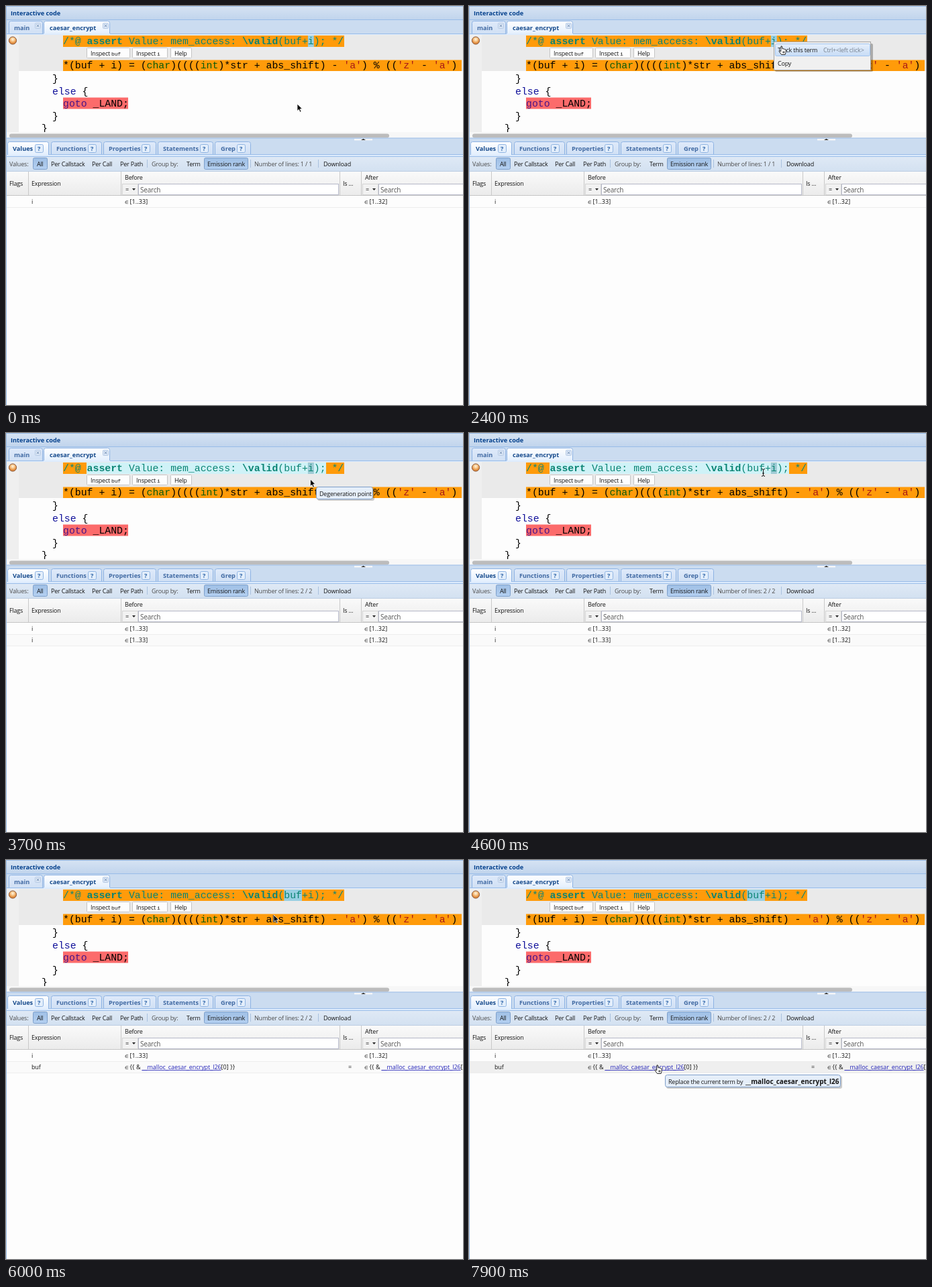
An HTML page that plays this animation: 681 px wide and 595 px high, repeating every 8000 ms.

```html
<!DOCTYPE html>
<html>
<head>
<meta charset="utf-8">
<style>
html, body { margin: 0; width: 100%; height: 100%; overflow: hidden; background: #fff; }
svg { display: block; }
text { font: 9px "Open Sans", "Noto Sans", sans-serif; letter-spacing: -.2px; white-space: pre; }
.b { font-weight: bold; font-size: 9.2px; letter-spacing: 0; }
.bi { font-weight: bold; font-style: italic; font-size: 9.7px; letter-spacing: 0; }
.term { font-weight: bold; font-size: 10px; letter-spacing: 0; }
.code { font: 14.83px "Liberation Mono", monospace; letter-spacing: 0; }
.mono { font-family: "Liberation Mono", monospace; font-size: 8px; }
.search { font-size: 10px; }
.num { letter-spacing: .1px; }
.link { letter-spacing: -.05px; }
.in { font: 6.5px "DejaVu Sans", sans-serif; }
.bold { font-weight: bold; }
</style>
</head>
<body>
<svg id="stage" width="681" height="595" viewBox="0 0 681 595"></svg>
<script>
const rect = (x, y, w, h, fill, more = '') =>
  `<rect x="${x}" y="${y}" width="${w}" height="${h}" fill="${fill}" ${more}/>`;
const box = (x, y, w, h, fill, stroke, r = 0) =>
  rect(x + .5, y + .5, w - 1, h - 1, fill, `stroke="${stroke}" rx="${r}"`);
const text = (x, y, s, cls = '', fill = '#151515') =>
  `<text x="${x}" y="${y}" class="${cls}" fill="${fill}">${s}</text>`;
const group = (id, s) => `<g id="${id}">${s}</g>`;
const span = (s, fill, cls = '') => `<tspan fill="${fill}" class="${cls}">${s}</tspan>`;
const gradient = (id, a, b) => `<linearGradient id="${id}" x2="0" y2="1">
  <stop stop-color="${a}"/><stop offset="1" stop-color="${b}"/></linearGradient>`;

const TEAL = '#0b8474', GREEN = '#0a5a0a', RED = '#a81818', NAVY = '#10109a';
const ORANGE = '#ff9b0a', EDGE = '#99bce8', BAR = '#cbdcf0', PAGE = '#fdfdfd', CHAR = 8.9;

function tab(x, w, y, label, active, labelX) {
  return box(x, y, w, 24, `url(#${active ? 'tabOn' : 'tabOff'})`, '#8db2e3', 3) +
    text(labelX, y + 14, label, 'b', active ? '#15498b' : '#416aa3');
}

function closeMark(x) {
  return box(x, 25, 9, 9, '#dce8f8', '#b4c8e2', 1) +
    `<path d="M${x + 2.7} 27.7l3.6 3.6m0-3.6l-3.6 3.6" stroke="#6482a8"/>`;
}

function helpTab(x, w, label, labelX, markX) {
  return tab(x, w, 202, label, x < 5, labelX) +
    box(markX, 206, 13, 13, '#e3eefb', '#8fb4e2', 2) + text(markX + 4, 216, '?', 'b', '#2d64a8');
}

function button(x, w, label) {
  return box(x, 62, w, 16, '#fdfdfd', '#c4c4c4', 1) + text(x + 6, 73.5, label);
}

function filter(x, inputX, w) {
  return box(x, 265, inputX - x, 17, '#f2f2f2', '#d4d4d4') + text(x + 5, 277, '=') +
    `<path d="M${x + 15} 272h5l-2.5 3z" fill="#222"/>` +
    box(inputX, 265, w, 17, '#fff', '#b5b8c8') + text(inputX + 3, 278, 'Search', 'search', '#555');
}

function codePane() {
  const first = span('/*@ ', TEAL) + span('assert', TEAL, 'bold') + span(' Value: mem_access: ', TEAL) +
    span('\\valid', TEAL, 'bold') + span('(buf+i); */', TEAL);
  const second = '*(buf + i) = (' + span('char', GREEN) + ')((((' + span('int', GREEN) +
    ')*str + abs_shift) - ' + span("'a'", RED) + ') % ((' + span("'z'", RED) + ' - ' + span("'a'", RED) + ')';
  const code = (x, y, s) => text(x, y, s, 'code', '#000');
  return rect(1, 43, 680, 145, PAGE) + rect(1, 43, 18, 145, '#efefef') + rect(19, 43, 662, 54, '#eaeaea') +
    rect(85, 44, 419, 17, ORANGE) + rect(85, 80.5, 594, 16.5, ORANGE) + rect(85, 136.5, 97, 17, '#fc6b6b') +
    group('hover', rect(120, 44, 357, 17, '#cff2f7')) +
    rect(0, 44, 0, 17, '#98cfe2', 'id="mark"') +
    '<circle cx="10" cy="51.5" r="5.6" fill="url(#ball)" stroke="#8c5a3c"/>' +
    code(85, 57, first) + code(85, 93, second) + code(69, 113, '}') +
    code(69, 131.5, span('else', NAVY) + ' {') + code(85, 150, span('goto', '#4a1486') + ' _LAND;') +
    code(69, 168.5, '}') + `<g clip-path="url(#pane)">${code(53, 187, '}')}</g>` +
    button(120, 65, 'Inspect ' + span('buf', '#151515', 'mono')) +
    button(188, 53, 'Inspect ' + span('i', '#151515', 'mono')) + button(245, 32, 'Help') +
    rect(1, 188, 680, 10, '#f7f7f7') + rect(5, 190.5, 566, 6, '#bcbcbc', 'rx="3"');
}

function chrome() {
  const link = '__malloc_caesar_encrypt_l26';
  const tools = [[67, 'Per Callstack'], [128, 'Per Call'], [170, 'Per Path'], [269, 'Term'], [473, 'Download']];
  const labels = [[5, 'Values:'], [217, 'Group by:']];
  const interval = (x, y, s) => text(x, y, '∈', 'in') + text(x + 7.5, y, s, 'num');
  const address = (x, y) => interval(x, y, '{{ &amp;') + text(x + 25.5, y, link, 'link', '#2222b8') +
    rect(x + 25.5, y + 1.2, 118, .8, '#2222b8') + text(x + 143.5, y, '[0] }}', 'num');
  const row = (y, name, before, after) => text(38, y, name) + before + after;
  const rowI = y => row(y, 'i', interval(177, y, '[1..33]'), interval(534, y, '[1..32]'));
  const rowBuf = y => row(y, 'buf', address(177, y), address(534, y)) + text(510, y, '=');
  return rect(0, 0, 681, 595, PAGE) + rect(0, 0, 681, 22, 'url(#title)') + rect(0, 0, 681, 1, EDGE) +
    text(7, 14, 'Interactive code', 'b', '#04408c') +
    rect(0, 21, 681, 22, BAR) + rect(0, 20, 681, 1, EDGE) +
    tab(4, 51, 22, 'main', false, 12) + tab(56, 99, 22, 'caesar_encrypt', true, 65) +
    closeMark(43) + closeMark(144) + rect(0, 41, 681, 2, '#deecfd') + rect(0, 41, 56, 1, EDGE) +
    rect(155, 41, 526, 1, EDGE) + codePane() +
    rect(0, 197, 681, 27, BAR) + rect(0, 196.5, 681, 1, EDGE) +
    rect(519, 198, 27, 2.5, '#f4f6f8') + '<path d="M529 200h7l-3.5-2z" fill="#222"/>' +
    helpTab(2, 62, 'Values', 10, 43) + helpTab(67, 76, 'Functions', 75, 122) +
    helpTab(145, 79, 'Properties', 153, 202) + helpTab(226, 83, 'Statements', 234, 289) +
    helpTab(311, 54, 'Grep', 320, 344) +
    rect(0, 222, 681, 3, '#deecfd') + rect(64, 221, 617, 1, EDGE) +
    rect(0, 225, 681, 21, 'url(#tool)') + rect(0, 224, 681, 1, EDGE) +
    box(40, 226, 22, 18, 'url(#press)', '#7d9fcb', 2) + box(295, 226, 66, 18, 'url(#press)', '#7d9fcb', 2) +
    text(46, 239, 'All') + text(300, 239, 'Emission rank') +
    tools.map(([x, s]) => text(x, 239, s)).join('') +
    labels.map(([x, s]) => text(x, 239, s, '', '#4c4c4c')).join('') +
    [210, 364, 465].map(x => rect(x, 229, 1, 12, '#a9c1de')).join('') +
    '<text id="count" x="370" y="239" fill="#4c4c4c"></text>' +
    rect(0, 246, 681, 37, 'url(#head)') + rect(0, 246, 681, 1, '#bccde2') + rect(0, 282, 681, 1, '#c5c5c5') +
    [33, 171, 497, 529].map(x => rect(x, 247, 1, 35, '#c9c9c9')).join('') +
    text(5, 268, 'Flags') + text(38, 268, 'Expression') + text(177, 258.5, 'Before') +
    text(502, 268, 'Is ...') + text(535, 258.5, 'After') + filter(173, 197, 299) + filter(531, 555, 130) +
    group('row1', rowI(295) + rect(1, 300, 680, 1, '#ededed')) +
    group('row2', rect(1, 301, 680, 16, '#fafafa', 'id="stripe"') + rect(1, 317, 680, 1, '#ededed') +
      group('termI', rowI(312)) + group('termBuf', rowBuf(312))) +
    group('mask', rect(1, 283, 680, 312, '#e1e1e1') + box(390, 481, 75, 26, '#d8e5f5', EDGE) +
      box(392, 483, 71, 22, '#f1f1f1', '#a9c4e6') + group('spinner', spinner()) + text(413, 497.5, 'Loading...')) +
    rect(0, 0, 1, 595, EDGE);
}

function spinner() {
  return [...Array(8).keys()].map(i =>
    `<circle cx="404" cy="489" r="1.6" fill="hsl(0 0% ${85 - i * 7}%)" transform="rotate(${i * 45} 404 494)"/>`).join('');
}

function popups() {
  const tip = (id, w, h, s) => group(id, rect(2, 2, w, h, '#0003', 'rx="3"') + box(0, 0, w, h, '#e5eef9', '#7f9fc9', 3) + s);
  return group('menu', rect(456, 56, 146, 42, '#0004', 'rx="2"') + box(454, 53, 145, 43, '#f0f0f0', '#a3a3a3') +
      box(456, 56, 142, 19, 'url(#item)', '#a0c4ef', 2) + text(460, 69, 'Track this term') +
      text(528, 69, 'Ctrl+&lt;left click>', '', '#77818e') + text(460, 89, 'Copy')) +
    tip('tipPoint', 85, 19, text(5, 13.5, 'Degeneration point')) +
    tip('tipHelp', 248, 61, text(5, 13, "This widget shows information about all the programs'") +
      text(5, 23.5, 'statements') + text(5, 44.5, 'Click for more help. You can hide this help in the', 'bi') +
      text(5, 54.5, span('Options', '#151515', 'b') + ' panel.', 'bi')) +
    tip('tipLink', 262, 19, text(5, 13.5, 'Replace the current term by ') +
      text(120, 13.5, '__malloc_caesar_encrypt_l26', 'term'));
}

function cursors() {
  return group('arrow', '<path d="M0 0v10.5l2.4-2.2 1.8 4 1.8-.8-1.8-3.9h3.3z" fill="#000" stroke="#fff" stroke-width=".8"/>') +
    group('beam', '<path d="M-2.5-5.5q2.5 0 2.5 2v7q0 2-2.5 2m5-11q-2.5 0-2.5 2v7q0 2 2.5 2M-1.5 1h3" fill="none" stroke="#111"/>') +
    group('hand', `<path d="M0 0q1.3-.8 1.7.8l.5 3.2q1-.8 1.7.2 1-.6 1.6.4 1.4-.4 1.6 1.2v3.4l-1 3.3h-5.6
      l-3.4-4.8q.1-1.6 1.8-.6l.8.9z M3 7.5v3m1.6-3v3" fill="#fff" stroke="#111" stroke-width=".9"/>`);
}

const stage = document.getElementById('stage');
stage.innerHTML = '<defs>' + gradient('title', '#d6e3f3', '#bfd3ec') + gradient('tabOn', '#fff', '#deecfd') +
  gradient('tabOff', '#dfeafa', '#cddef3') + gradient('tool', '#dfe9f5', '#d3e1f1') +
  gradient('press', '#9fbfe5', '#b4d0f1') + gradient('head', '#fafafa', '#ebebeb') +
  gradient('item', '#e6effb', '#c7dcf6') +
  `<radialGradient id="ball" cx=".5" cy=".35"><stop stop-color="#fff6e4"/><stop offset=".5" stop-color="#f8c88c"/>
   <stop offset="1" stop-color="#e08a3c"/></radialGradient><clipPath id="pane">${rect(0, 43, 681, 145, '#000')}</clipPath></defs>` +
  chrome() + popups() + cursors();

const el = id => document.getElementById(id);
const show = (id, on) => { el(id).style.display = on ? '' : 'none'; };
const place = (id, x, y) => el(id).setAttribute('transform', `translate(${x} ${y})`);

// pointer: time, x, y
const path = [[0, 434, 146], [200, 434, 146], [800, 454, 62], [1100, 451, 66], [1500, 453, 62], [1900, 454, 52],
  [2100, 454, 53], [2400, 465, 60], [3300, 465, 60], [3600, 453, 69], [3700, 453.5, 69], [4300, 454, 68],
  [4900, 423, 50], [5800, 423, 50], [6500, 302, 211], [6900, 301, 213], [7100, 301, 213], [7600, 280, 306], [8000, 280, 306]];

function pointer(t) {
  const n = path.findIndex(p => p[0] > t);
  const [a, b] = [path[n - 1], path[n]];
  const k = (t - a[0]) / (b[0] - a[0]), e = k * k * (3 - 2 * k);
  return [a[1] + (b[1] - a[1]) * e, a[2] + (b[2] - a[2]) * e];
}

function draw(t) {
  const within = (a, b) => t >= a && t < b;
  const [x, y] = pointer(t);
  const tracked = t >= 3100, onBuf = t >= 5100;
  const mask = within(2800, 3100) || within(5200, 5700);
  const hover = within(700, 2000) || within(3400, 5100);

  show('hover', hover);
  el('mark').setAttribute('x', 85 + CHAR * (onBuf ? 37 : 41));
  el('mark').setAttribute('width', CHAR * (onBuf ? 3 : 1));
  el('mark').setAttribute('fill', hover ? '#9dcad4' : '#98cfe2');
  el('count').textContent = tracked ? 'Number of lines: 2 / 2' : 'Number of lines: 1 / 1';
  show('mask', mask);
  el('spinner').setAttribute('transform', `rotate(${t * .45} 404 494)`);
  show('row1', !mask);
  show('row2', tracked && !mask);
  show('termI', !onBuf);
  show('termBuf', onBuf);
  el('stripe').setAttribute('fill', t >= 7500 ? '#efefef' : '#fafafa');

  show('menu', within(2000, 2800));
  const tips = { tipPoint: within(800, 1900) || within(3500, 4600), tipHelp: within(6600, 7200), tipLink: t >= 7600 };
  for (const id in tips) show(id, tips[id]);
  place('tipPoint', Math.round(x) + 8, Math.round(y) + 11);
  place('tipHelp', 314, 229);
  place('tipLink', 292, 320);

  const hand = within(2200, 2800) || within(6400, 7200) || t >= 7600;
  const beam = !hand && y < 61 && !within(2000, 3400);
  const shown = hand ? 'hand' : beam ? 'beam' : 'arrow';
  for (const id of ['hand', 'beam', 'arrow']) show(id, id === shown);
  place(shown, x, y);
}

function tick() {
  draw(Math.floor(performance.now() % 8000 / 100) * 100);
  requestAnimationFrame(tick);
}
tick();
</script>
</body>
</html>
```
